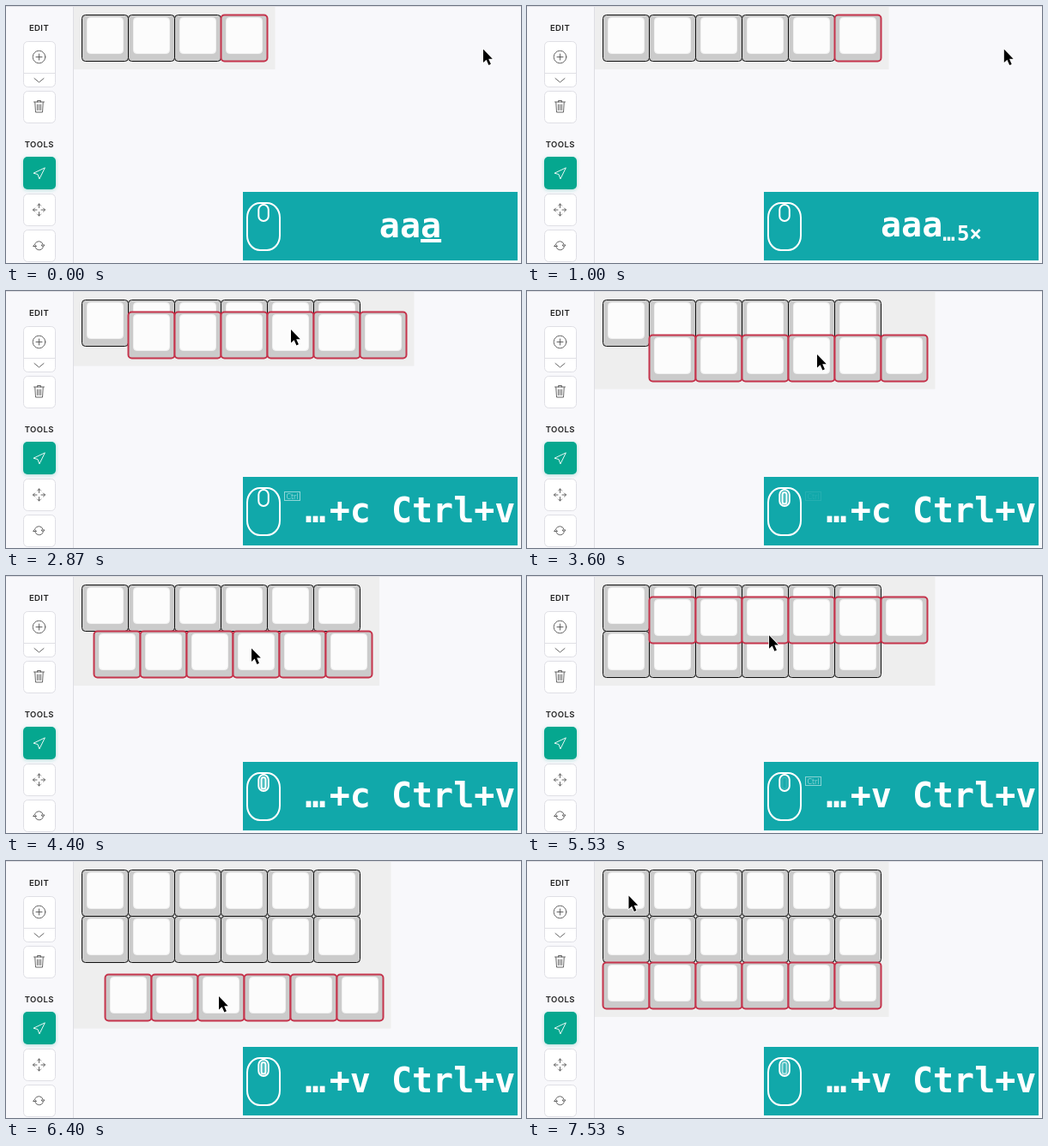
Recreate the animation shown at these times as an HTML page. Size 600 by 300 pixels, loop 7.6 s.

```html
<!DOCTYPE html>
<html lang="en">
<head>
<meta charset="utf-8">
<title>Copy and paste keys</title>
<style>
  html, body { margin: 0; width: 100%; height: 100%; overflow: hidden; background: #f8f8fb; }
  svg { display: block; }
  .label { font: 600 9.5px Inter, "Open Sans", sans-serif; letter-spacing: .4px; fill: #222; text-anchor: middle; }
  .button { fill: #fff; stroke: #dfdfe5; }
  .active { fill: #05a78f; filter: drop-shadow(0 1px 2px #05a78f50); }
  .icon { fill: none; stroke: #555; stroke-width: .9; stroke-linecap: round; stroke-linejoin: round; }
  .keys { font: bold 40px "DejaVu Sans Mono", monospace; fill: #fff; white-space: pre; text-anchor: middle; }
  .small { font-size: 24px; }
  .dots { letter-spacing: .1em; }
  .fresh { text-decoration: underline 2px; text-underline-offset: 1px; text-decoration-skip-ink: none; }
  .mouse { fill: none; stroke: #fff; stroke-width: 2; }
</style>
</head>
<body>
<svg width="600" height="300" viewBox="0 0 600 300">
  <rect width="600" height="300" fill="#f8f8fb"/>
  <path d="M0 .5H600M78.5 0V300" stroke="#dedee3"/>
  <g id="board"></g>

  <text class="label" x="38.5" y="29">EDIT</text>
  <text class="label" x="38.8" y="165">TOOLS</text>
  <g class="button">
    <rect x="20.5" y="41.5" width="37" height="53" rx="5"/>
    <path d="M20.5 78.5H57.5"/>
    <rect x="20.5" y="99.5" width="37" height="37" rx="5"/>
    <rect x="20.5" y="219.5" width="37" height="37" rx="5"/>
    <rect x="20.5" y="261.5" width="37" height="37" rx="5"/>
  </g>
  <rect class="active" x="20" y="176" width="38" height="38" rx="5"/>
  <g class="icon">
    <circle cx="38.5" cy="59.5" r="7.3"/>
    <path d="M35 59.5H42M38.5 56V63M33 84.5L38.5 89L44 84.5"/>
    <path d="M32.5 112H44.5M36.5 112V110.5H40.5V112M33.8 112.5L34.5 124H42.5L43.2 112.5M36.5 115V121.5M38.5 115V121.5M40.5 115V121.5"/>
    <path stroke="#fff" d="M45 189L32 195.2L37 196.5L38.8 201.5Z"/>
    <path d="M38.5 231V235.5M38.5 240.5V245M31.5 238H36M41 238H45.5M36.5 233L38.5 231L40.5 233M36.5 243L38.5 245L40.5 243M33.5 236L31.5 238L33.5 240M43.5 236L45.5 238L43.5 240"/>
    <path d="M33.8 277.5A5 5 0 0 1 43 278M43.2 282A5 5 0 0 1 34 281.5M41.5 279H45L43.3 281ZM32 280.5H35.5L33.7 278.5Z"/>
  </g>

  <rect x="276" y="217" width="320" height="80" fill="#11a8aa"/>
  <g class="mouse">
    <rect x="281" y="230" width="38" height="55" rx="15" ry="17"/>
    <path d="M300 230V233"/>
    <rect x="294.3" y="232" width="11.5" height="19" rx="5.7"/>
    <rect id="click" x="297.5" y="235" width="5" height="13.5" rx="2.5" fill="#fff" fill-opacity=".25"/>
  </g>
  <g id="ctrl">
    <g opacity=".75">
      <rect x="324.5" y="234.5" width="18" height="10" fill="none" stroke="#fff"/>
      <text x="333.5" y="242.5" font-family="DejaVu Sans, sans-serif" font-size="8" fill="#fff" text-anchor="middle">Ctrl</text>
    </g>
  </g>
  <text id="typed" class="keys" x="471" y="270"></text>
  <path id="pointer" d="M0 0V15.5L3.6 12.2L6.4 18.5L8.9 17.3L6.2 11.2H10.8Z" stroke="#fff" stroke-width="1.6" paint-order="stroke"/>
</svg>
<script>
const LOOP = 7600, STEP = LOOP / 114, UNIT = 54, SNAP = UNIT / 4;
const MOVE = 700, FADE = 1200, RECENT = 130;
const el = id => document.getElementById(id);

// Pointer stops: arrival time, place
const stops = [
  [0, 556, 50.5], [1670, 520.5, 66], [2870, 332, 45], [3600, 338, 74], [4500, 283, 85],
  [5400, 286, 80], [5730, 275, 50], [6400, 248, 158], [7130, 221, 145], [7530, 118.5, 40.5]
];

// Each paste is dragged from one stop to another, then fills its row
const pastes = [
  { at: 2530, grab: stops[2], drop: stops[4], row: 1 },
  { at: 5130, grab: stops[6], drop: stops[8], row: 2 }
];
const clicks = pastes.map(p => [p.grab[0], p.drop[0]]);
const ctrlHolds = [[1600, pastes[0].at], [5000, pastes[1].at]];
const added = [330, 600], selectAll = 1700;

// {…} is the small repeat count, _ starts the newest stroke
const lines = [
  [-70, 'aa_a'], [added[0], 'aaa{…4×}'], [added[1], 'aaa{…5×}'], [selectAll, '…{…5×} _Ctrl+a'],
  [2130, '…+a _Ctrl+c'], [pastes[0].at, '…+c _Ctrl+v'], [pastes[1].at, '…+v _Ctrl+v']
];

function pointerAt(t) {
  const i = stops.findIndex(s => s[0] > t);
  if (i < 0) return stops.at(-1).slice(1);
  const [t0, x0, y0] = stops[i - 1], [t1, x1, y1] = stops[i];
  const begin = Math.max(t0, t1 - MOVE);
  const u = Math.max(0, (t - begin) / (t1 - begin)), s = u * u * (3 - 2 * u);
  return [x0 + (x1 - x0) * s, y0 + (y1 - y0) * s];
}

function glow(holds, t) {
  const last = holds.findLast(h => t >= h[0]);
  return last ? Math.min(1, Math.max(0, 1 - (t - last[1]) / FADE)) : 0;
}

function pastedAt({ grab, drop, row }, t) {
  if (t >= drop[0]) return [0, row];
  if (t < grab[0]) return [1, .25];
  const [x, y] = pointerAt(t), snap = d => Math.round(d / SNAP) / 4;
  return [1 + snap(x - grab[1]), .25 + snap(y - grab[2])];
}

function key({ x, y, selected }) {
  const crisp = v => Math.floor(v) + .5;
  const px = crisp(88.5 + x * UNIT), py = crisp(10.5 + y * UNIT);
  const line = selected ? 'stroke="#c5344c" stroke-width="2"' : 'stroke="#111"';
  return `<rect x="${px}" y="${py}" width="54" height="54" rx="4" fill="#cbcbcb" ${line}/>
    <rect x="${px + 6}" y="${py + 3}" width="42" height="42" rx="4" fill="#fcfcfc" stroke="#f0f0f0"/>`;
}

function board(t) {
  const count = 4 + added.filter(a => t >= a).length;
  const rows = [[0, 0], ...pastes.filter(p => t >= p.at).map(p => pastedAt(p, t))];
  const keys = rows.flatMap(([x, y], r) => Array.from({ length: count }, (_, i) => ({
    x: x + i, y,
    selected: r === rows.length - 1 && (t >= selectAll || i === count - 1)
  })));
  keys.sort((a, b) => a.selected - b.selected);
  const width = 18.5 + (Math.max(...keys.map(k => k.x)) + 1) * UNIT;
  const height = 19 + (Math.max(...keys.map(k => k.y)) + 1) * UNIT;
  return `<rect x="79" y="1" width="${width}" height="${height}" fill="#eee"/>` + keys.map(key).join('');
}

function typed(t) {
  const [at, line] = lines.findLast(l => t >= l[0]);
  const style = t - at < RECENT ? 'fresh' : '';
  return line
    .replace(/_(.*)/, `<tspan class="${style}">$1</tspan>`)
    .replace(/\{(.*)\}( ?)/, '<tspan class="small" dy="5">$1</tspan><tspan dy="-5">$2</tspan>')
    .replaceAll('…', '<tspan class="dots">…</tspan>');
}

const start = performance.now();
function frame(now) {
  const elapsed = Math.max(0, now - start) % LOOP;
  const t = Math.floor((elapsed + 4) / STEP) * STEP % LOOP;
  const text = typed(t);
  el('board').innerHTML = board(t);
  el('typed').innerHTML = text;
  el('typed').setAttribute('y', text.includes('small') ? 268.5 : 270);
  el('click').setAttribute('opacity', glow(clicks, t));
  el('ctrl').setAttribute('opacity', glow(ctrlHolds, t));
  el('pointer').setAttribute('transform', `translate(${pointerAt(t)})`);
  requestAnimationFrame(frame);
}
frame(start);
</script>
</body>
</html>
```
